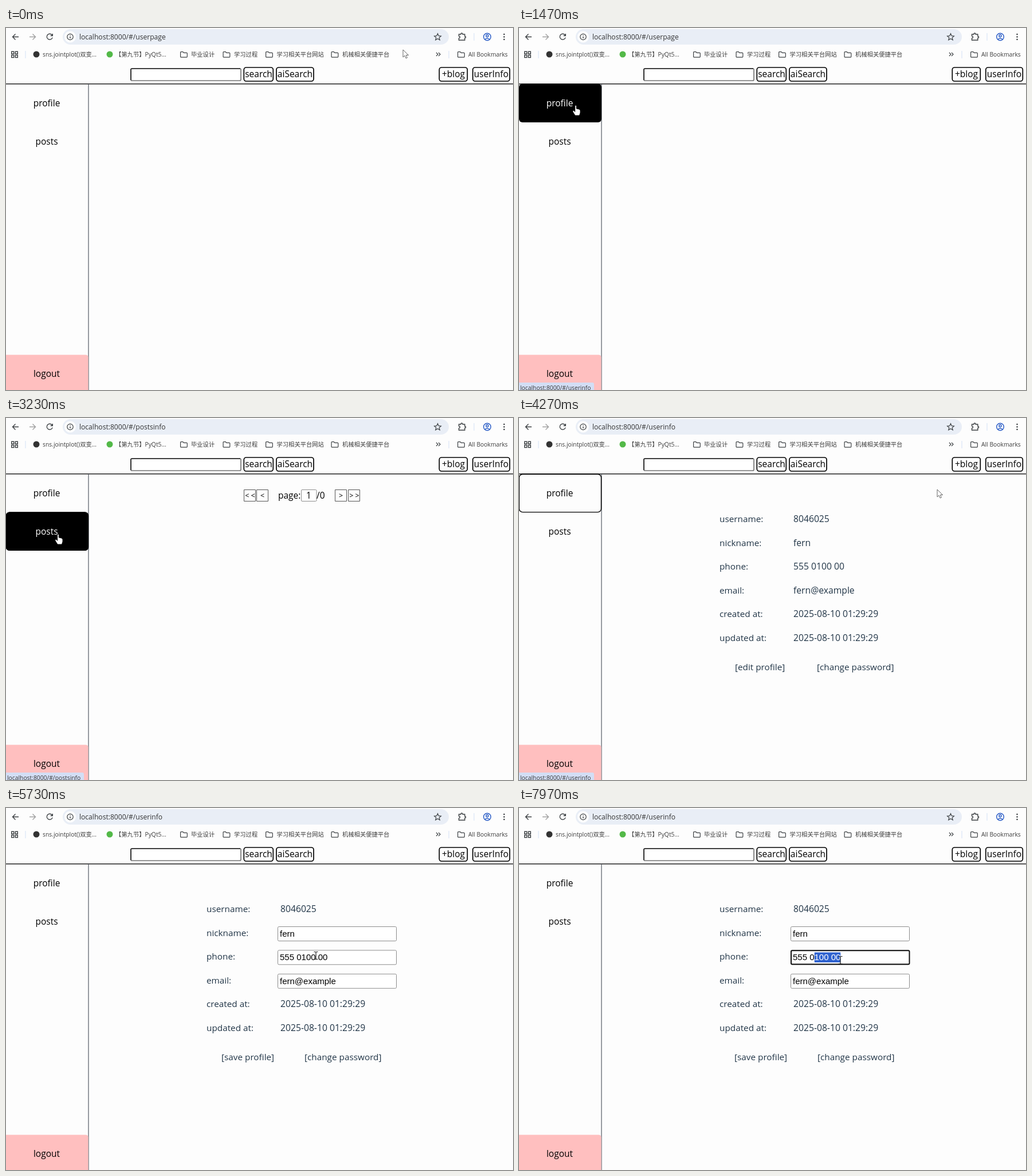
An HTML page for the animation above (8 s loop, 885x633 px).

```html
<!DOCTYPE html>
<html lang="en">
<head>
<meta charset="utf-8">
<title>User page</title>
<style>
html, body { margin: 0; width: 100%; height: 100%; overflow: hidden; background: #fdfdfd; }
svg { display: block; width: 885px; height: 633px; }
text { font-family: "Open Sans", "Noto Sans CJK SC", sans-serif; white-space: pre; }
.nav { font-size: 15.5px; }
.label { font-size: 15.3px; fill: #213547; }
.value { font-size: 15.7px; fill: #213547; }
.url { font-size: 12.1px; fill: #333; }
.small { font-size: 10.3px; fill: #3c3c3c; }
.field { font: 15px "Liberation Sans", Arial, sans-serif; }
.mid { text-anchor: middle; }
.icon { fill: none; stroke: #3c4043; stroke-width: 1.4; }
.button { fill: none; stroke: #000; stroke-width: 1.7; }
.input { fill: #fff; stroke: #8c8c8c; }
.page-button { fill: none; stroke: #555; }

/* One clock for everything: 1% is 80 ms */
[class^="on-"] { visibility: hidden; animation: 8s step-end infinite; }
.on-home { animation-name: home; }
.on-info-url { animation-name: infoUrl; }
.on-info { animation-name: info; }
.on-posts { animation-name: posts; }
.on-edit { animation-name: edit; }
.on-profile-hover { animation-name: profileHover; }
.on-posts-hover { animation-name: postsHover; }
.on-info-status { animation-name: infoStatus; }
.on-posts-status { animation-name: postsStatus; }
.on-focus { animation-name: focus; }
.on-arrow { animation-name: arrow; }
.on-hand { animation-name: hand; }
.on-beam { animation-name: beam; }
@keyframes home { 0% { visibility: visible } 18.75%, 100% { visibility: hidden } }
@keyframes infoUrl { 0%, 31.25% { visibility: hidden } 18.75%, 47.5%, 100% { visibility: visible } }
@keyframes info { 0%, 31.25%, 65.7%, 100% { visibility: hidden } 18.75%, 47.5% { visibility: visible } }
@keyframes posts { 0%, 47.5%, 100% { visibility: hidden } 31.25% { visibility: visible } }
@keyframes edit { 0% { visibility: hidden } 65.7%, 100% { visibility: visible } }
@keyframes profileHover { 0%, 24.6%, 49%, 100% { visibility: hidden } 9.2%, 41.5% { visibility: visible } }
@keyframes postsHover { 0%, 41.5%, 100% { visibility: hidden } 24.6% { visibility: visible } }
@keyframes infoStatus { 0%, 24.6%, 55%, 100% { visibility: hidden } 12%, 41.5% { visibility: visible } }
@keyframes postsStatus { 0%, 41.5%, 100% { visibility: hidden } 24.6% { visibility: visible } }
@keyframes focus { 0% { visibility: hidden } 75.9%, 100% { visibility: visible } }
@keyframes arrow { 0%, 49%, 66.2% { visibility: visible } 9.2%, 62.8%, 70%, 100% { visibility: hidden } }
@keyframes hand { 0%, 49%, 66.2%, 100% { visibility: hidden } 9.2%, 62.8% { visibility: visible } }
@keyframes beam { 0% { visibility: hidden } 70%, 100% { visibility: visible } }

#selection { animation: select 8s linear infinite; }
@keyframes select {
  0%, 76.3% { clip-path: inset(0 100% 0 0) }
  79%, 100% { clip-path: inset(0) }
}
#pointer { animation: move 8s ease-in-out infinite; }
@keyframes move {
  0%, .4% { transform: translate(693px, 38px) }
  9.6%, 11.6% { transform: translate(125px, 150px) }
  15.4%, 23.4% { transform: translate(98px, 135px) }
  25.9%, 40.4% { transform: translate(90px, 203px) }
  42.1%, 47.5% { transform: translate(98px, 138px) }
  53.375% { transform: translate(730px, 125px) }
  57.1% { transform: translate(795px, 112px) }
  63.4%, 65.7% { transform: translate(422px, 437px) }
  71.6% { transform: translate(541px, 258px) }
  75.4%, 76.2% { transform: translate(514px, 262px) }
  81.6%, 85.9% { transform: translate(667px, 266px) }
  86.3%, 88.75% { transform: translate(578px, 272px) }
  90.4%, 93.4% { transform: translate(570px, 267px) }
  95.9%, 97.9% { transform: translate(500px, 262px) }
  99.6%, 100% { transform: translate(561px, 266px) }
}
</style>
</head>
<body>
<svg viewBox="0 0 885 633">
  <defs>
    <path id="folder" class="icon" style="stroke-width:1.2" d="M.6 1.6q0-1 1-1h3.2l1.5 1.7h5q1 0 1 1v5.8q0 1-1 1H1.6q-1 0-1-1z"/>
    <rect id="tab" x="-6" y=".5" width="149.5" height="66.5" rx="6"/>
  </defs>

  <!-- Browser toolbar -->
  <rect x="99" y="2" width="674" height="27" rx="13.5" fill="#e9eef6"/>
  <path class="icon" d="M22 15.500H11.500M16.500 10.500l-5 5 5 5"/>
  <path class="icon" style="stroke:#a0a0a0" d="M41 15.500H51.500M46.500 10.500l5 5-5 5"/>
  <path class="icon" d="M80.500 12.600a5 5 0 1 0 .6 4M81.300 10v3.500h-3.600"/>
  <circle cx="112" cy="15.500" r="10" fill="#fff"/>
  <circle class="icon" cx="112" cy="15.500" r="5.200" style="stroke-width:1.2"/>
  <path class="icon" d="M112 15v3.300M112 12.500v1.300"/>
  <path class="icon" style="stroke-width:1.2" d="M753.500 9.800l1.700 3.900 4.200.4-3.200 2.800 1 4.100-3.700-2.200-3.700 2.200 1-4.100-3.200-2.800 4.200-.4z"/>
  <path class="icon" d="M790.500 11h3.500q0-2 1.500-2t1.500 2h3.800v3.500q1.800 0 1.800 1.500t-1.800 1.500v3.800h-10.300v-3.400q2-.3 2-1.900t-2-1.900z"/>
  <path d="M817 9v13M34 40v13M773 40v13" stroke="#d3e0f5"/>
  <g class="icon" style="stroke:#2458c5">
    <circle cx="840" cy="15.500" r="6.300"/>
    <circle cx="840" cy="13.800" r="2"/>
    <path d="M835.700 19.700q4.300-3 8.600 0"/>
  </g>
  <g fill="#3c4043">
    <circle cx="869.500" cy="11" r="1.300"/><circle cx="869.500" cy="15.500" r="1.300"/><circle cx="869.500" cy="20" r="1.300"/>
  </g>
  <g class="url">
    <g class="on-home"><text x="128" y="19.500">localhost:8000/#/userpage</text></g>
    <g class="on-info-url"><text x="128" y="19.500">localhost:8000/#/userinfo</text></g>
    <g class="on-posts"><text x="128" y="19.500">localhost:8000/#/postsinfo</text></g>
  </g>

  <!-- Bookmarks -->
  <path class="icon" d="M9.700 41.200h4v4h-4zM16.300 41.200h4v4h-4zM9.700 47.500h4v4h-4zM16.300 47.500h4v4h-4z"/>
  <circle cx="53" cy="46" r="5.500" fill="#333"/>
  <circle cx="181" cy="46" r="5.500" fill="#53b948"/>
  <use href="#folder" x="304" y="41"/>
  <use href="#folder" x="378.500" y="41"/>
  <use href="#folder" x="453" y="41"/>
  <use href="#folder" x="567.500" y="41"/>
  <use href="#folder" x="788" y="41"/>
  <g class="small">
    <text x="64" y="50">sns.jointplot()双变...</text>
    <text x="191" y="50">【第九节】PyQt5...</text>
    <text x="323" y="50">毕业设计</text>
    <text x="398" y="50">学习过程</text>
    <text x="472.500" y="50">学习相关平台网站</text>
    <text x="587" y="50">机械相关便捷平台</text>
    <text x="807" y="50">All Bookmarks</text>
  </g>
  <path class="icon" style="stroke-width:1.2" d="M751 43l3 3-3 3M755 43l3 3-3 3"/>

  <!-- Page header -->
  <rect x="218" y="71" width="192" height="21" rx="2" fill="#fff" stroke="#767676" stroke-width="1.700"/>
  <path d="M218 91V73q0-2 2-2h189" fill="none" stroke="#222" stroke-width="1.700"/>
  <rect class="button" x="415.300" y="69" width="51" height="24" rx="4"/>
  <rect class="button" x="472" y="69" width="65" height="24" rx="4"/>
  <rect class="button" x="756.300" y="69" width="49" height="24" rx="4"/>
  <rect class="button" x="814.800" y="69" width="64.500" height="24" rx="4"/>
  <g class="nav mid">
    <text x="441" y="86">search</text>
    <text x="504.500" y="86">aiSearch</text>
    <text x="781" y="86">+blog</text>
    <text x="847" y="86">userInfo</text>
  </g>
  <path d="M0 97.700H885" stroke="#222" stroke-width="1.500"/>

  <!-- Sidebar -->
  <path d="M144 98V633" stroke="#6a7079" stroke-width="1.400"/>
  <path d="M0 571.500H139q4.500 0 4.500 4.500V633H0z" fill="#ffbfbf"/>
  <g fill="none" stroke="#000" stroke-width="1.400">
    <g class="on-info"><rect x=".3" y="98.300" width="143.200" height="66.300" rx="6"/></g>
    <g class="on-posts"><rect x=".3" y="165" width="143.200" height="66.300" rx="6"/></g>
  </g>
  <g class="nav mid">
    <text x="71" y="137">profile</text>
    <text x="71" y="203.500">posts</text>
    <text x="71" y="609.500">logout</text>
    <g class="on-profile-hover">
      <rect y="97.500" width="144" height="67.500" rx="6"/>
      <text x="71" y="137" fill="#fff">profile</text>
    </g>
    <g class="on-posts-hover">
      <rect y="164.500" width="144" height="67.500" rx="6"/>
      <text x="71" y="203.500" fill="#fff">posts</text>
    </g>
  </g>

  <!-- Profile details -->
  <g id="details"></g>
  <g class="on-info">
    <text class="value" x="479" y="223.500">fern</text>
    <text class="value" x="479" y="265">555 0100 00</text>
    <text class="value" x="479" y="306.500">fern@example</text>
    <text class="label" x="377" y="440.500">[edit profile]</text>
    <text class="label" x="520" y="440.500">[change password]</text>
  </g>
  <g class="on-edit">
    <rect class="input" x="474.500" y="207.500" width="207" height="25" rx="2"/>
    <rect class="input" x="474.500" y="248.800" width="207" height="25" rx="2"/>
    <rect class="input" x="474.500" y="290.300" width="207" height="25" rx="2"/>
    <text class="field" x="478" y="224.500">fern</text>
    <text class="field" x="478" y="266">555 0100 00</text>
    <text class="field" x="478" y="307.500">fern@example</text>
    <text class="label" x="376" y="440.500">[save profile]</text>
    <text class="label" x="521" y="440.500">[change password]</text>
  </g>
  <g class="on-focus">
    <rect x="475" y="249.300" width="206.500" height="24" rx="2" fill="none" stroke="#111" stroke-width="2"/>
    <g id="selection">
      <rect x="515.500" y="252.500" width="46" height="17.500" fill="#2f62cf"/>
      <text class="field" x="515.500" y="266" fill="#fff">100 00</text>
    </g>
  </g>

  <!-- Posts pager -->
  <g class="on-posts">
    <path class="page-button" d="M415.500 125.500h20v20h-20zM437.500 125.500h20v20h-20zM574.500 125.500h20v20h-20zM597.500 125.500h20v20h-20z"/>
    <rect class="input" x="515.500" y="125.500" width="26.500" height="20" rx="1.500"/>
    <g class="mid" font-size="12.500">
      <text x="426" y="140">&lt; &lt;</text>
      <text x="447.500" y="140">&lt;</text>
      <text x="584.500" y="140">&gt;</text>
      <text x="608" y="140">&gt; &gt;</text>
      <text class="nav" x="528.500" y="141">1</text>
    </g>
    <text class="nav" x="475" y="141">page:</text>
    <text class="nav" x="542" y="141">/0</text>
  </g>

  <!-- Link preview -->
  <g class="small">
    <g class="on-info-status">
      <path d="M0 620H128q3 0 3 3V633H0z" fill="#d3def5"/>
      <text x="2" y="633">localhost:8000/#/userinfo</text>
    </g>
    <g class="on-posts-status">
      <path d="M0 620H133q3 0 3 3V633H0z" fill="#d3def5"/>
      <text x="2" y="633">localhost:8000/#/postsinfo</text>
    </g>
  </g>

  <g id="pointer">
    <g class="on-arrow">
      <path d="M0 0V13l3-2.700 2.200 4.700 2.200-1-2.100-4.500H9.500z" fill="#fff" stroke="#555" stroke-width=".9"/>
    </g>
    <g class="on-hand">
      <path d="M-.3 1.500Q-.3 0 1 0t1.300 1.500V6l4.500 1q2.200.6 2.200 2.700v3.500L7.500 18H0L-3.800 12q-.9-1.600.2-2.400 1.200-.7 2.300.6l1 1.200z" fill="#fff" stroke="#000" stroke-width=".9"/>
    </g>
    <g class="on-beam">
      <path d="M-3.500-6.500H-1.500Q0-6.500 0-5.500 0-6.500 1.500-6.500H3.500M0-5.500V5.500M-3.500 6.500H-1.500Q0 6.500 0 5.500 0 6.500 1.500 6.500H3.500" fill="none" stroke="#222" stroke-width="1.200"/>
    </g>
  </g>
</svg>
<script>
const stamp = "2025-08-10 01:29:29";
const rows = [
  ["username:", "8046025"], ["nickname:"], ["phone:"], ["email:"],
  ["created at:", stamp], ["updated at:", stamp],
];
const markup = rows.map(([label, value = ""], i) => {
  const y = 182 + i * 41.5;
  return `<text class="label" x="350" y="${y}">${label}</text>
    <text class="value" x="479" y="${y}">${value}</text>`;
}).join("");
// The rows are shared by the read-only and the editable view.
document.getElementById("details").innerHTML =
  `<g class="on-info">${markup}</g><g class="on-edit">${markup}</g>`;
</script>
</body>
</html>
```
